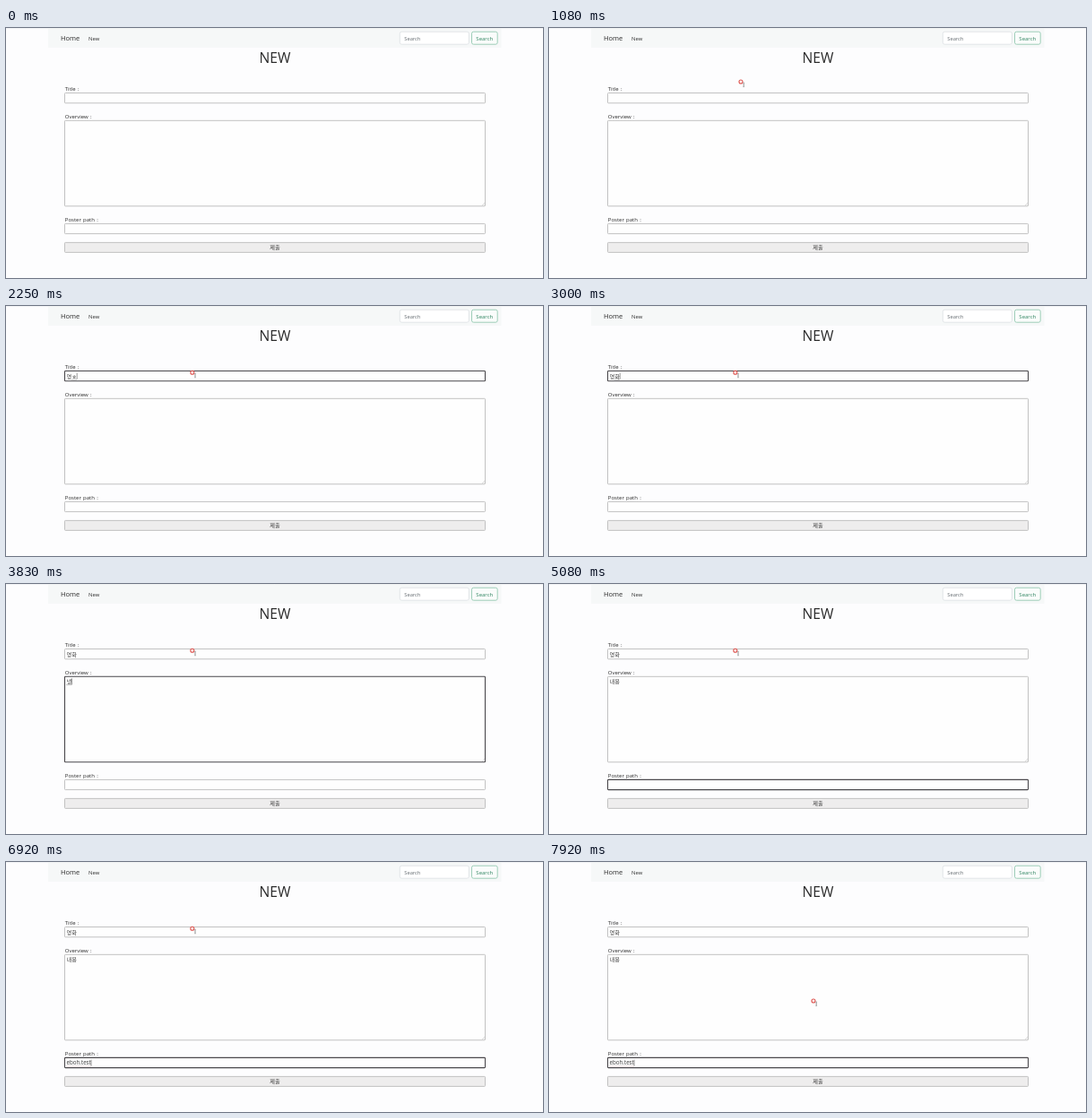
An HTML page with a canvas for the animation above (8000 ms loop, 599x279 px).

```html
<!DOCTYPE html>
<html lang="ko">
<head>
<meta charset="utf-8">
<title>New</title>
<style>
  html, body { margin: 0; width: 100%; height: 100%; overflow: hidden; background: #fdfdfe; }
  canvas { display: block; width: 599px; height: 279px; }
</style>
</head>
<body>
<canvas id="stage"></canvas>
<script>
const W = 599, H = 279, LOOP = 8000, STEP = 1000 / 12, BLINK = 530;
const FONT = '"Open Sans", "Noto Sans CJK KR", "Noto Sans CJK", sans-serif';
const canvas = document.getElementById('stage');
const ctx = canvas.getContext('2d');
const scale = window.devicePixelRatio || 1;
canvas.width = W * scale;
canvas.height = H * scale;

const SITE = 'eboh.test';
const fields = {
  title: { y: 72.5, h: 11.3, base: 80.5, size: 6.2 },
  overview: { y: 103.3, h: 95.5, base: 111.1, size: 6.2 },
  poster: { y: 218.4, h: 11.2, base: 226.4, size: 6.2 }
};

// Keystrokes: time, focused field, its value
const keys = [
  [1250, 'title', ''],
  [1580, 'title', 'ㅇ'],
  [1670, 'title', '여'],
  [1830, 'title', '영'],
  [2250, 'title', '영ㅎ'],
  [2420, 'title', '영호'],
  [2580, 'title', '영화'],
  [3420, 'overview', ''],
  [3580, 'overview', 'ㄴ'],
  [3670, 'overview', '내'],
  [3830, 'overview', '냉'],
  [4000, 'overview', '내요'],
  [4170, 'overview', '내용'],
  [4420, 'poster', ''],
  ...[5420, 5580, 5670, 5830, 6080, 6250, 6420, 6580, 6670]
    .map((time, i) => [time, 'poster', SITE.slice(0, i + 1)])
];

// Suggestion lists: start, end, top, height, label, has a bottom edge
const lists = [
  [1330, 1670, 84, 23, '제목1', false],
  [5500, 6750, 229.8, 21, SITE, true]
];

// Pointer path: time, x, y
const path = [
  [830, 262, 170], [1080, 214, 60], [1250, 207.8, 74.2],
  [7420, 207.8, 74.2], [7920, 295, 155]
];

function text(str, x, y, size, color = '#2a2a2a', align = 'left') {
  ctx.font = `${size}px ${FONT}`;
  ctx.fillStyle = color;
  ctx.textAlign = align;
  ctx.fillText(str, x, y);
  return ctx.measureText(str).width;
}

function box(x, y, w, h, r, fill, stroke, line = 0.9) {
  ctx.beginPath();
  ctx.roundRect(x, y, w, h, r);
  ctx.fillStyle = fill;
  ctx.fill();
  ctx.strokeStyle = stroke;
  ctx.lineWidth = line;
  ctx.stroke();
}

function segment(x1, y1, x2, y2, color, line = 0.8) {
  ctx.beginPath();
  ctx.moveTo(x1, y1);
  ctx.lineTo(x2, y2);
  ctx.strokeStyle = color;
  ctx.lineWidth = line;
  ctx.stroke();
}

function drawPage() {
  ctx.fillStyle = '#fdfdfe';
  ctx.fillRect(0, 0, W, H);
  ctx.fillStyle = '#f6f8f8';
  ctx.fillRect(47, 0, 505.5, 22);
  segment(0, 0.5, W, 0.5, '#f0f2f3');

  ctx.wordSpacing = '0.7px';
  text('Home', 61, 14.3, 7.5);
  text('New', 92, 14, 5.9, '#333');
  box(439.3, 4.2, 77, 14, 2, '#fff', '#dfe3e6');
  text('Search', 444.2, 13.9, 5.8, '#666d72');
  box(519.5, 4.2, 28.7, 14, 2, '#fafcfb', '#93c9b1');
  text('Search', 533.8, 13.9, 6, '#2f8560', 'center');

  text('NEW', 300, 38.5, 15.6, '#2a2a2a', 'center');
  text('Title :', 65.8, 70.3, 6);
  text('Overview :', 65.8, 100.9, 6);
  text('Poster path :', 65.8, 215.7, 6);
  ctx.wordSpacing = '0px';
  box(65.5, 239.4, 469, 11, 0.8, '#eeeded', '#bcbcbc');
  text('제출', 300, 247.3, 6.2, '#333', 'center');
}

function drawField(name, value, focused, idle) {
  const f = fields[name];
  box(65.5, f.y, 469, f.h, 0.8, '#fefefe', focused ? '#4a484c' : '#bcbcbc', focused ? 1.1 : 0.9);
  if (name === 'overview') {
    segment(531, 198, 534, 195, '#bbb', 0.5);
    segment(532.7, 198, 534, 196.7, '#bbb', 0.5);
  }
  const end = 67.5 + text(value, 67.5, f.base, f.size, '#3c3c3c');
  if (!focused) return;
  if (value && name !== 'poster') {
    segment(end - f.size, f.base + 1.5, end, f.base + 1.5, '#888', 0.5);
  }
  if (value === SITE) {
    ctx.setLineDash([1, 1]);
    segment(67.5, f.base + 1.5, end, f.base + 1.5, '#b88', 0.6);
    ctx.setLineDash([]);
  }
  if (Math.floor(idle / BLINK) % 2 === 0) {
    segment(end + 0.3, f.base - 5.8, end + 0.3, f.base + 1.3, '#555', 0.6);
  }
}

function drawList([, , y, h, label, edge]) {
  ctx.fillStyle = '#fefefe';
  ctx.fillRect(65, y, 75.5, h);
  segment(65.5, y, 65.5, y + h, '#e2e2e2');
  segment(140.5, y, 140.5, y + h, '#d8d8d8');
  segment(65, y + 0.4, 141, y + 0.4, '#dadada');
  if (edge) segment(65, y + h - 0.2, 141, y + h - 0.2, '#c4c4c4');
  text(label, 70, y + 12, 5.2, '#555');
}

function pointerAt(t) {
  if (t < path[0][0]) return null;
  const i = path.findIndex(p => p[0] > t);
  if (i < 0) return path[path.length - 1].slice(1);
  const [t0, x0, y0] = path[i - 1], [t1, x1, y1] = path[i];
  const p = (t - t0) / (t1 - t0);
  const k = p * p * (3 - 2 * p);
  return [x0 + (x1 - x0) * k, y0 + (y1 - y0) * k];
}

function drawPointer([x, y]) {
  ctx.beginPath();
  ctx.arc(x, y, 2, 0, Math.PI * 2);
  ctx.strokeStyle = '#de5550';
  ctx.lineWidth = 1.1;
  ctx.stroke();
  segment(x + 3.2, y + 1, x + 3.2, y + 5.6, '#666', 0.7);
  segment(x + 2.3, y + 1, x + 4.1, y + 1, '#888', 0.5);
  segment(x + 2.3, y + 5.6, x + 4.1, y + 5.6, '#888', 0.5);
}

function draw(t) {
  const values = { title: '', overview: '', poster: '' };
  let focus = null, last = 0;
  for (const [time, name, value] of keys) {
    if (time > t) break;
    values[name] = value;
    focus = name;
    last = time;
  }
  ctx.setTransform(scale, 0, 0, scale, 0, 0);
  drawPage();
  for (const name in fields) drawField(name, values[name], name === focus, t - last);
  lists.filter(l => t >= l[0] && t < l[1]).forEach(drawList);
  const pointer = pointerAt(t);
  if (pointer) drawPointer(pointer);
}

const start = performance.now();
function frame() {
  const t = (performance.now() - start) % LOOP;
  draw(Math.floor((t + 4) / STEP) * STEP);
  requestAnimationFrame(frame);
}
frame();
</script>
</body>
</html>
```
